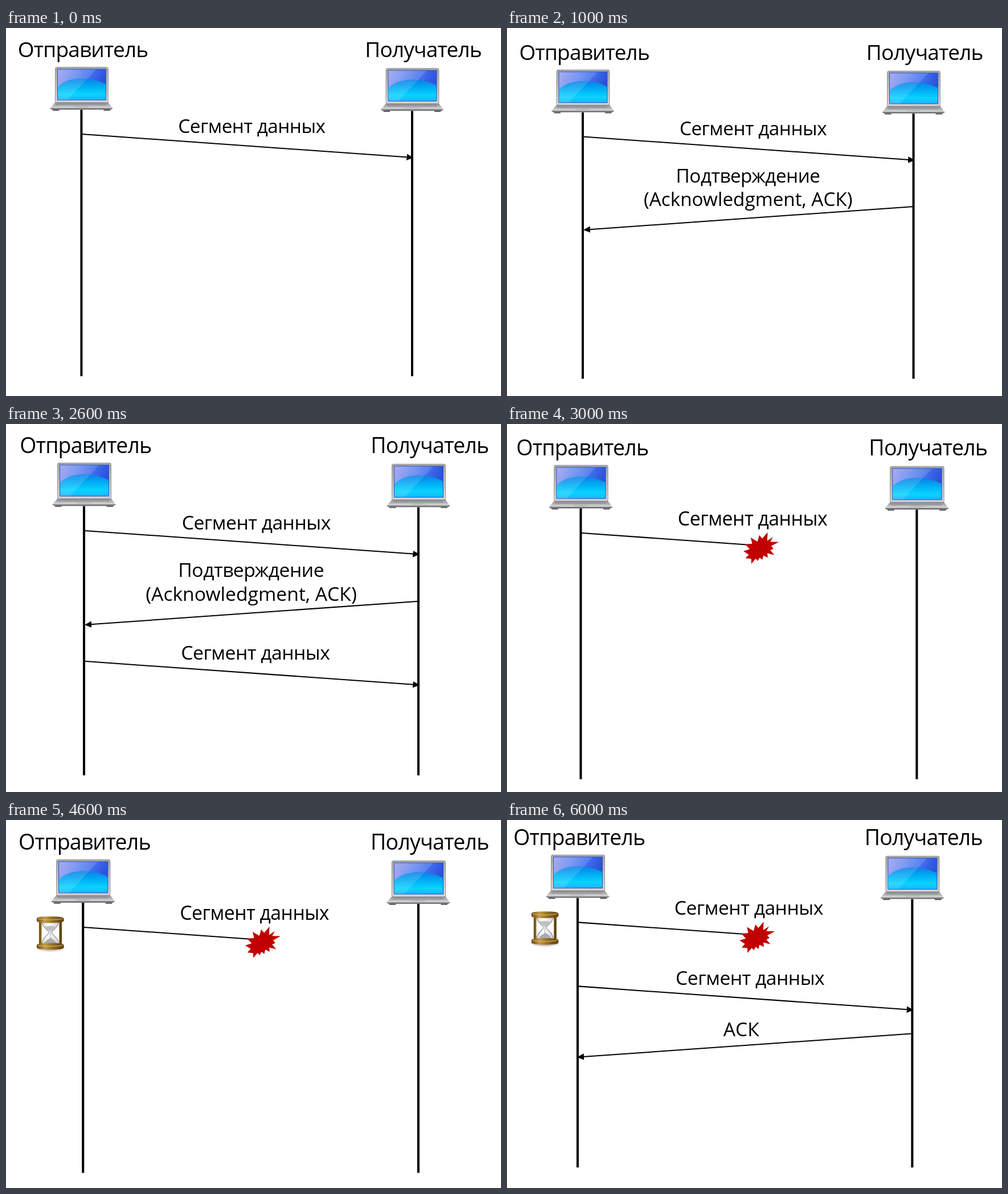
Animation, 869 px wide and 645 px high, one loop 7 s. Source, as an HTML page:

```html
<!DOCTYPE html>
<html lang="ru">
<head>
<meta charset="utf-8">
<title>Подтверждение доставки</title>
<style>
  html, body { margin: 0; width: 100%; height: 100%; overflow: hidden; background: #fff; }
  svg { display: block; }
  text { font-family: "Open Sans", "Noto Sans", sans-serif; font-size: 33.3px; text-anchor: middle; letter-spacing: -.015em; }
  .title { font-size: 37px; letter-spacing: -.022em; }
  .latin { letter-spacing: 0; }
  .life { stroke: #000; stroke-width: 4; }
  .msg { stroke: #000; stroke-width: 2; }
</style>
</head>
<body>
<svg id="stage" width="869" height="645" viewBox="0 0 869 645">
  <defs>
    <marker id="head" markerUnits="userSpaceOnUse" markerWidth="12" markerHeight="12" refX="9" refY="6" orient="auto">
      <path d="M0 .3L12 6L0 11.7Z"/>
    </marker>
    <linearGradient id="sky" x2="1" y2=".3">
      <stop offset="0" stop-color="#9d9ff0"/><stop offset=".4" stop-color="#6488f0"/>
      <stop offset=".7" stop-color="#3f6cec"/><stop offset="1" stop-color="#2a50dc"/>
    </linearGradient>
    <linearGradient id="wave" x2="0" y2="1">
      <stop offset="0" stop-color="#0a7ee6"/><stop offset=".45" stop-color="#00b4f6"/>
      <stop offset=".75" stop-color="#08d4ff"/><stop offset="1" stop-color="#1cb4fa"/>
    </linearGradient>
    <linearGradient id="lid" x2="0" y2="1">
      <stop offset="0" stop-color="#a5a6a8"/><stop offset=".8" stop-color="#c9cacc"/><stop offset="1" stop-color="#d6d6d6"/>
    </linearGradient>
    <linearGradient id="deck" x2="0" y2="1">
      <stop offset="0" stop-color="#8c8d8f"/><stop offset="1" stop-color="#d2d3d4"/>
    </linearGradient>
    <linearGradient id="gold" x2="1">
      <stop offset="0" stop-color="#6d4c12"/><stop offset=".3" stop-color="#c39a45"/>
      <stop offset=".55" stop-color="#9a7426"/><stop offset="1" stop-color="#5b3d0c"/>
    </linearGradient>
    <linearGradient id="glass" x2="1">
      <stop offset="0" stop-color="#d3d4d8"/><stop offset=".4" stop-color="#fff"/><stop offset="1" stop-color="#cfd0d4"/>
    </linearGradient>
    <radialGradient id="shade">
      <stop offset="0" stop-color="#000" stop-opacity=".4"/><stop offset="1" stop-color="#000" stop-opacity="0"/>
    </radialGradient>

    <g id="laptop">
      <path d="M-51 74.5h12v2.2h-11zM39 74.5h12l-1 2.2h-11z" fill="#55565a"/>
      <rect x="-46" y=".5" width="93" height="62" rx="3" fill="url(#lid)" stroke="#97989b"/>
      <rect x="-42.5" y="3.5" width="86" height="55" fill="#2c52c4"/>
      <rect x="-41.5" y="4.5" width="84" height="53" fill="url(#sky)"/>
      <path d="M-41.5 35C-26 17 14 15 42.5 30V57.5H-41.5Z" fill="url(#wave)"/>
      <path d="M-41.5 4.5H26L-24 57.5H-41.5Z" fill="#fff" opacity=".13"/>
      <path d="M-46 62H47L54 71.5H-54Z" fill="url(#deck)"/>
      <path d="M-43 64H43M-44 66.5H44" stroke="#77787b" stroke-dasharray="3 1"/>
      <path d="M-12 68.5H12L13 71H-13Z" fill="#b4b5b7"/>
      <path d="M-54.5 71.5H54.5V73.5L51 75H-51L-54.5 73.5Z" fill="#77787b"/>
      <path d="M-54 71.6H54" stroke="#dedede"/>
    </g>

    <g id="hourglass">
      <ellipse cx="24" cy="56" rx="27" ry="6" fill="url(#shade)"/>
      <path d="M9 9H38C38 20 26 24 26 28S38 36 38 48H9C9 36 21 32 21 28S9 20 9 9Z" fill="url(#glass)" stroke="#85868b"/>
      <path d="M14 18Q24 15 33 18Q31 22 24 27Q16 22 14 18Z" fill="#bfc0c3"/>
      <path d="M23.5 27V38" stroke="#aaa"/>
      <path d="M12 47Q16 41 24 37Q32 41 35 47Z" fill="#aaabae"/>
      <path d="M4 9h4.5v40H4zM39 9h4.5v40H39z" fill="url(#gold)"/>
      <path id="cap" d="M0 4Q0 0 23.5 0T47 4V8Q46 11.5 23.5 11.5T0 8Z" fill="url(#gold)"/>
      <path d="M2 4Q23 8 45 4" fill="none" stroke="#d9bd77"/>
      <use href="#cap" y="46"/>
      <path d="M2 50Q23 54 45 50" fill="none" stroke="#d9bd77"/>
    </g>

    <path id="burst" fill="#c00000" d="M115 43L148 0L145 58L180 32L164 65L216 66L170 94L183 113L164 123L189 156L146 144L149 174L122 159L116 188L99 174L87 197L75 181L49 216L48 182L13 178L33 154L0 129L39 116L12 83L54 78L45 36L86 64L97 19Z"/>
  </defs>
</svg>
<script>
const STEP = 1000;
const SPAN = 580.6;

const label = (x, y, words, kind = '') => `<text class="${kind}" x="${x}" y="${y}">${words}</text>`;
const arrow = (x1, y1, x2, y2) =>
  `<line class="msg" x1="${x1}" y1="${y1}" x2="${x2}" y2="${y2}" marker-end="url(#head)"/>`;
const host = (x, y) =>
  `<line class="life" x1="${x}" y1="${y + 75}" x2="${x}" y2="542"/><use href="#laptop" x="${x}" y="${y}"/>`;

const hosts = host(0, 0) + host(SPAN, 2)
  + label(2.7, -17, 'Отправитель', 'title') + label(600.2, -17, 'Получатель', 'title');

const segment = (y, textX, textY) => label(textX, textY, 'Сегмент данных') + arrow(1, y, 580, y + 41);

const first = segment(117.8, 299, 115.5);
const ack = label(290, 198, 'Подтверждение')
  + label(290.3, 239.5, '(Acknowledgment, АСК)', 'latin') + arrow(SPAN, 240.2, 4, 280.9);
const second = segment(344.2, 297.6, 341.7);
const lost = label(296.8, 104.2, 'Сегмент данных')
  + '<line class="msg" x1="1" y1="117.3" x2="293" y2="138"/>'
  + '<use href="#burst" transform="translate(280.9 116.2) scale(.284 .251)"/>';
const timer = '<use href="#hourglass" x="-80.2" y="98.5"/>';
const retry = segment(228, 299.2, 225.8);
const shortAck = label(284, 314.6, 'АСК', 'latin') + arrow(578.5, 310.2, 2, 350.8);

// left line x, laptop top y, scale, messages
const scenes = [
  [132.4, 68.2, 1, first],
  [133, 72.8, 1, first + ack],
  [137, 67.8, 1.011, first + ack + second],
  [129.5, 71.8, 1.016, lost],
  [135.2, 69, 1.014, lost + timer],
  [126, 59, 1.0265, lost + timer + retry],
  [124, 60.7, 1.0117, lost + timer + retry + shortAck],
];

const stage = document.getElementById('stage');
const groups = scenes.map(([x, y, scale, messages]) => {
  const g = document.createElementNS('http://www.w3.org/2000/svg', 'g');
  g.setAttribute('transform', `translate(${x} ${y}) scale(${scale})`);
  g.innerHTML = hosts + messages;
  return stage.appendChild(g);
});

const start = performance.now();
function draw() {
  const now = Math.floor((performance.now() - start) / STEP) % scenes.length;
  groups.forEach((g, i) => g.style.display = i === now ? '' : 'none');
  requestAnimationFrame(draw);
}
draw();
</script>
</body>
</html>
```
